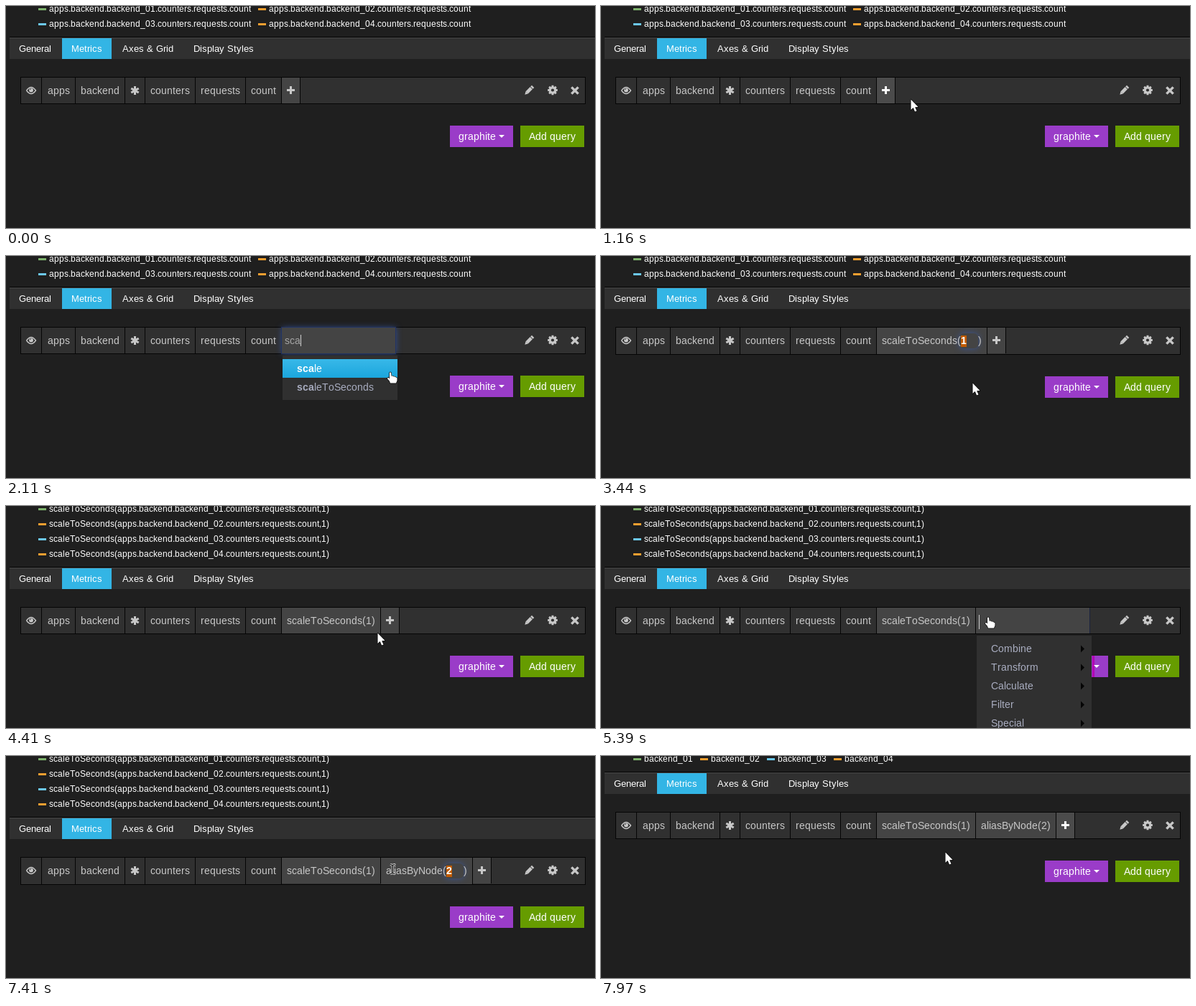
Animation of 820 by 310 pixels, one loop 8 s. Source, as an HTML page with a canvas:

```html
<!DOCTYPE html>
<html lang="en">
<head>
<meta charset="utf-8">
<title>Query editor</title>
<style>
html, body { margin: 0; width: 100%; height: 100%; overflow: hidden; background: #1f1f1f; }
canvas { display: block; width: 820px; height: 310px; }
</style>
</head>
<body>
<canvas id="stage" width="820" height="310"></canvas>
<script>
const LOOP = 8000;
const ctx = document.getElementById('stage').getContext('2d');
const FONT = '"Liberation Sans", Arial, sans-serif';
const GREY = '#c8c8c8', BAR = '#303030', FUNC = '#444444', LINE = '#050505', BLUE = '#33b5e5';
const SERIES = ['#7eb26d', '#f29f30', '#6cc8ec', '#f29f30'];
const advances = {};

const rect = (x, y, w, h, color) => { ctx.fillStyle = color; ctx.fillRect(x, y, w, h); };
const clamp = v => Math.max(0, Math.min(1, v));

// Text on whole-pixel advances; returns the end position.
function text(str, x, y, size, color, weight = 'normal') {
  ctx.font = `${weight} ${size}px ${FONT}`;
  ctx.fillStyle = color;
  for (const ch of str) {
    const key = ctx.font + ch;
    advances[key] ??= Math.round(ctx.measureText(ch).width);
    ctx.fillText(ch, x, y);
    x += advances[key];
  }
  return x;
}

function poly(points, close = true) {
  ctx.beginPath();
  for (let i = 0; i < points.length; i += 2) ctx.lineTo(points[i], points[i + 1]);
  if (close) ctx.closePath();
}

function at(x, y, draw) {
  ctx.save();
  ctx.translate(x, y);
  draw();
  ctx.restore();
}

function spokes(count, radius, width) {
  ctx.lineWidth = width;
  ctx.beginPath();
  for (let i = 0; i < count; i++) {
    const a = Math.PI / 2 + i * Math.PI / count;
    const dx = Math.cos(a) * radius, dy = Math.sin(a) * radius;
    ctx.moveTo(-dx, -dy);
    ctx.lineTo(dx, dy);
  }
  ctx.stroke();
}

const icons = {
  eye() {
    ctx.lineWidth = 1.3;
    ctx.beginPath();
    ctx.moveTo(-6.5, 0);
    ctx.quadraticCurveTo(0, -9, 6.5, 0);
    ctx.quadraticCurveTo(0, 9, -6.5, 0);
    ctx.stroke();
    ctx.beginPath();
    ctx.arc(0, -0.6, 2.9, 0, 7);
    ctx.fill();
    ctx.strokeStyle = BAR;
    ctx.lineWidth = 0.9;
    ctx.beginPath();
    ctx.arc(0, -0.8, 1.5, Math.PI, Math.PI * 1.5);
    ctx.stroke();
  },
  asterisk() { spokes(3, 6, 3); },
  pencil() {
    ctx.rotate(Math.PI / 4);
    ctx.fillRect(-2.3, -8, 4.6, 2.6);
    ctx.fillRect(-2.3, -4.6, 4.6, 8.6);
    poly([-2.3, 4, 2.3, 4, 0, 8]);
    ctx.fill();
  },
  cog() {
    spokes(4, 6.8, 2.9);
    ctx.lineWidth = 3.2;
    ctx.beginPath();
    ctx.arc(0, 0, 3.7, 0, 7);
    ctx.stroke();
    ctx.fillStyle = BAR;
    ctx.beginPath();
    ctx.arc(0, 0, 2.1, 0, 7);
    ctx.fill();
  },
  cross() { ctx.rotate(Math.PI / 4); spokes(2, 6.6, 3.4); }
};

const icon = (name, x, y) => at(x, y, () => {
  ctx.fillStyle = ctx.strokeStyle = GREY;
  icons[name]();
});

const pointers = {
  arrow() { poly([.5, .5, .5, 15, 3.7, 12, 6, 17.5, 8.6, 16.4, 6.2, 11.2, 10.6, 11]); },
  hand() {
    poly([-1, 1, 0, .2, 1.2, 1, 1.6, 5.5, 4, 5.6, 4.8, 6.6, 7, 6.6, 7.8, 7.6, 9.5, 8.3, 9.5, 12,
      8, 15.5, 0, 15.5, -1.2, 12.5, -4, 9.6, -3.4, 7.8, -2.2, 8, -1, 9.5]);
  },
  beam() { poly([-3, -6.5, 0, -5.5, 3, -6.5, 0, -5.5, 0, 5.5, 3, 6.5, 0, 5.5, -3, 6.5], false); }
};

const path = [
  [640, 802, 186], [1160, 431, 130], [1440, 396, 115], [1670, 396, 115], [2110, 535, 162],
  [2590, 535, 162], [2800, 503, 180], [3000, 503, 180], [3360, 517, 176], [3440, 517, 177],
  [4410, 517, 177], [4690, 543, 147], [4910, 543, 147], [4950, 540, 149], [5130, 540, 149],
  [5170, 539, 155], [5390, 539, 155], [5630, 538, 158], [7480, 538, 158], [7500, 537, 157]
];

function pointerPos(t) {
  if (t >= 7970) return [479, 134];
  const i = path.findIndex(p => p[0] > t);
  if (i < 0) return path[path.length - 1].slice(1);
  const [t0, x0, y0] = path[i - 1], [t1, x1, y1] = path[i];
  let u = (t - t0) / (t1 - t0);
  u = i === 1 ? 1 - (1 - u) ** 1.6 : u * u * (3 - 2 * u);
  return [x0 + (x1 - x0) * u, y0 + (y1 - y0) * u];
}

function pointerKind(t) {
  if (t < 1350) return 'arrow';
  if (t < 3100) return 'hand';
  if (t < 4580) return 'arrow';
  if (t < 5500) return 'hand';
  return t < 7480 ? 'beam' : 'arrow';
}

function pointer(t) {
  if (t < 640) return;
  const kind = pointerKind(t);
  const [x, y] = pointerPos(t).map(Math.round);
  at(x, y, () => {
    pointers[kind]();
    const beam = kind === 'beam';
    ctx.lineJoin = 'round';
    ctx.strokeStyle = beam ? '#ddd' : '#000';
    ctx.lineWidth = beam ? 3 : 1.3;
    ctx.stroke();
    ctx.strokeStyle = '#000';
    ctx.fillStyle = '#fff';
    if (beam) { ctx.lineWidth = 1.3; ctx.stroke(); } else ctx.fill();
  });
}

function legend(t) {
  const base = n => `apps.backend.backend_0${n}.counters.requests.count`;
  const item = (i, label, x, y) => {
    rect(x, y - 5, 11, 3, SERIES[i]);
    return text(label, x + 15, y, 12, '#fff') + 10;
  };
  let x = 45;
  for (let i = 0; i < 4; i++) {
    if (t < 4190) {
      x = item(i, base(i + 1), i % 2 ? x : 45, i < 2 ? 8 : 29);
    } else if (t < 7610) {
      item(i, `scaleToSeconds(${base(i + 1)},1)`, 45, 8 + 21 * i);
    } else {
      x = item(i, `backend_0${i + 1}`, x, 8);
    }
  }
}

function tabs() {
  rect(5, 43, 815, 1, '#000');
  rect(5, 44, 815, 1, '#4a4a4a');
  rect(5, 45, 815, 29, BAR);
  rect(78, 45, 69, 29, BLUE);
  [['General', 18], ['Metrics', 91], ['Axes & Grid', 162], ['Display Styles', 261]]
    .forEach(([label, x]) => text(label, x, 64, 13, '#fff'));
}

function glow(x, y, w, h, radius, alpha) {
  if (alpha <= 0) return;
  ctx.save();
  ctx.shadowColor = `rgba(55,90,175,${0.75 * alpha})`;
  ctx.shadowBlur = 8;
  ctx.fillStyle = FUNC;
  ctx.beginPath();
  ctx.roundRect(x, y, w, h, radius);
  ctx.fill();
  ctx.restore();
}

function plus(x, hot) {
  rect(x, 100, 25, 36, hot ? '#4b4b4b' : FUNC);
  rect(x + 25, 100, 1, 36, LINE);
  const color = hot ? '#fff' : GREY;
  rect(x + 7, 116, 11, 3, color);
  rect(x + 11, 112, 3, 11, color);
}

// Function segment, optionally with its parameter being edited.
function func(name, param, x, editing, hot) {
  const grow = editing ? 1 : 0;
  const color = hot ? '#fff' : GREY;
  const start = x + 7;
  const nameEnd = text(name + '(', start, -50, 14, color);
  const paramEnd = nameEnd + (editing ? 24 : 8);
  const end = paramEnd + 12;
  rect(x, 100, end - x, 36 + grow, FUNC);
  rect(end, 100, 1, 36 + grow, LINE);
  if (editing) {
    glow(nameEnd - 2, 108, 26, 21, 6, 1);
    rect(nameEnd, 111, 8, 16, '#c05a00');
  }
  text(name + '(', start, 123, 14, color);
  text(param, nameEnd, 123, 14, editing ? '#fff' : color, editing ? 'bold' : 'normal');
  text(')', paramEnd, 123, 14, color);
  return end + 1;
}

function input(x, value, focus, caret) {
  glow(x, 100, 159, 36, 1, focus);
  rect(x, 100, 158, 36, FUNC);
  rect(x + 158, 100, 1, 36, focus ? '#1b2440' : LINE);
  if (focus) {
    ctx.strokeStyle = `rgba(35,55,110,${0.8 * focus})`;
    ctx.lineWidth = 1;
    ctx.strokeRect(x - .5, 99.5, 159, 37);
  }
  const end = text(value, x + 4, 123, 14, '#a5a5a5');
  if (caret) rect(end, 110, 1, value ? 16 : 20, '#d0d0d0');
}

function menu(x, items, typed, active) {
  const left = x + 1;
  rect(left, 139, 160, items.length * 26 + 10, BAR);
  items.forEach((label, i) => {
    const top = 144 + i * 26, on = i === active;
    if (on) {
      const g = ctx.createLinearGradient(0, top, 0, top + 26);
      g.addColorStop(0, '#38b8e8');
      g.addColorStop(1, '#1ba6dd');
      rect(left, top, 160, 26, g);
    }
    const color = on ? '#fff' : '#a9adc0';
    const end = text(label.slice(0, typed), left + 20, top + 18, 14, color, 'bold');
    text(label.slice(typed), end, top + 18, 14, color);
    if (!typed) {
      ctx.fillStyle = '#050505';
      poly([left + 145, top + 8.5, left + 150, top + 13.5, left + 145, top + 18.5]);
      ctx.fill();
    }
  });
}

const GROUPS = ['Combine', 'Transform', 'Calculate', 'Filter', 'Special'];
const SCALE = ['scale', 'scaleToSeconds'];
const ALIAS = ['alias', 'aliasByMetric', 'aliasByNode', 'aliasSub'];

const typedCount = (t, times) => times.filter(k => t >= k).length;

function lookup(word, n) {
  if (!n) return GROUPS;
  if (word === 'sca') return n > 1 ? SCALE : ['sumSeries', ...SCALE, 'summarize', 'smartSummarize'];
  return n > 1 ? ALIAS : ['averageSeries', 'absolute', ...ALIAS.slice(0, 3)];
}

function picker(t, x, word, opened, keys, active) {
  const n = typedCount(t, keys);
  input(x, word.slice(0, n), clamp((t - opened) / 200), true);
  menu(x, lookup(word, n), n, active);
}

function buttons(y, strip) {
  rect(618, y, 88, 30, '#9a3cc8');
  if (strip) rect(684, y, 3, 30, '#b400b4');
  text('graphite', 630, y + 20, 14, '#fff');
  ctx.fillStyle = '#fff';
  poly([686, y + 13, 694, y + 13, 690, y + 17]);
  ctx.fill();
  rect(716, y, 89, 30, '#669c00');
  text('Add query', 728, y + 20, 14, '#fff');
}

function query(t) {
  const scaleEdit = t >= 3040 && t < 4020;
  const aliasEdit = t >= 7410 && t < 7520;
  const grow = scaleEdit || aliasEdit ? 1 : 0;
  buttons(167 + grow, t >= 5390 && t < 7410);

  rect(20, 99, 787, 38 + grow, LINE);
  rect(21, 100, 785, 36 + grow, BAR);
  icon('eye', 35, 118);
  rect(49, 100, 1, 36 + grow, LINE);
  let x = 51;
  for (const label of ['apps', 'backend', '*', 'counters', 'requests', 'count']) {
    let end;
    if (label === '*') {
      icon('asterisk', x + 13.5, 118);
      end = x + 20;
    } else {
      end = text(label, x + 7, 123, 14, GREY);
    }
    x = end + 8;
    rect(x - 1, 100, 1, 36 + grow, LINE);
  }
  icon('pencil', 728, 118);
  icon('cog', 761, 117.5);
  icon('cross', 792, 118);

  if (t < 1670) return plus(x, t >= 1100);
  if (t < 3040) {
    const active = t < 2040 ? -1 : t < 2700 ? 0 : 1;
    return picker(t, x, 'sca', 1670, [1830, 1930, 2030], active);
  }
  x = func('scaleToSeconds', '1', x, scaleEdit, t >= 4440 && t < 4580);
  if (t < 5390) return plus(x, t >= 4600);
  if (t < 7410) {
    const active = typedCount(t, [6760, 6890, 7020]) - 1;
    return picker(t, x, 'alias', 5390, [5980, 6110, 6290, 6350, 6410], active);
  }
  x = func('aliasByNode', '2', x, aliasEdit);
  plus(x, t >= 7520);
}

function draw(t) {
  rect(0, 0, 820, 310, '#1f1f1f');
  legend(t);
  at(0, t < 4190 ? 0 : t < 7610 ? 42 : -21, () => {
    tabs();
    query(t);
  });
  pointer(t);
}

const start = performance.now();
function tick() {
  draw((performance.now() - start) % LOOP);
  requestAnimationFrame(tick);
}
tick();
</script>
</body>
</html>
```
